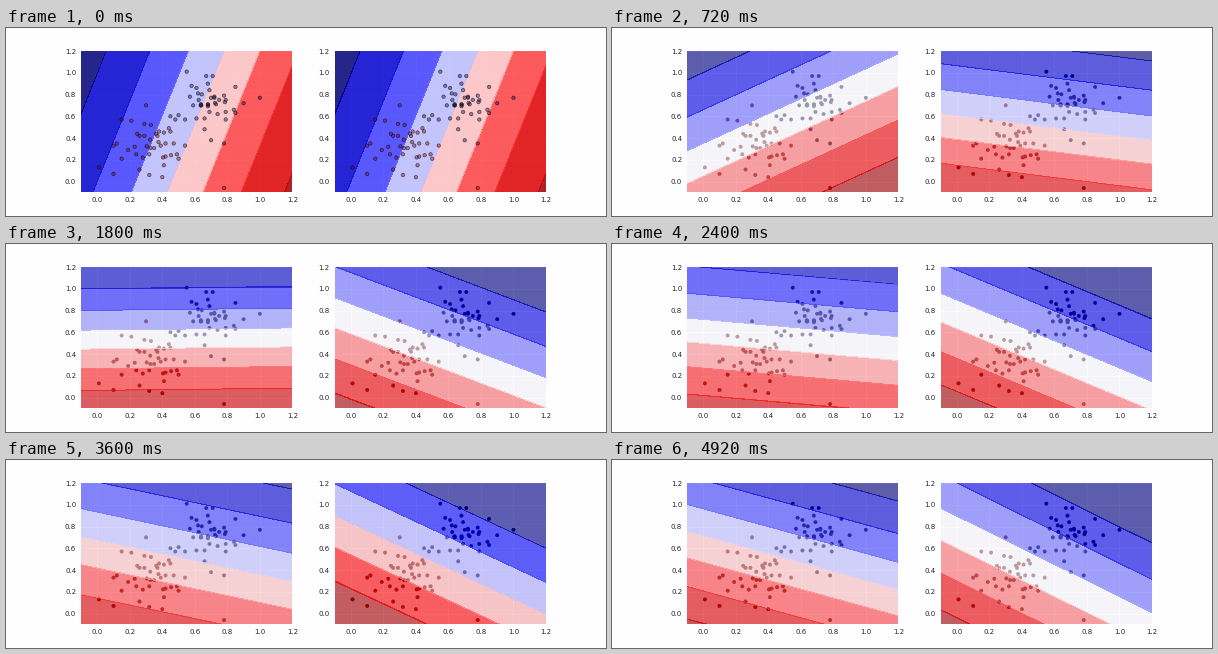
Write a matplotlib script that moves like this. It is 600 by 188 pixels and loops after 5 s.

```python
import matplotlib.pyplot as plt
import numpy as np
from matplotlib.animation import FuncAnimation

W, H, DPI = 600, 188, 50
LOW, HIGH = -0.1, 1.2
ALPHA = 0.6          # opacity of the score bands
TICK_MS, STEP_MS, LOOP_MS = 40, 100, 5000
CMAP = plt.get_cmap("seismic_r")

plt.rcParams.update({"font.family": "DejaVu Sans", "font.size": 10})

# Training steps at which both classifiers are known.
KEYS = np.array([0, 3, 11, 18, 30, 41, 49])
# angle: direction of the score gradient, measured from the y axis (degrees)
# mid, gap: centre and spacing of the score levels; bands: number of colours
MODELS = [
    dict(angle=[-74.9, -57.3, -17.7, -0.9, 12.8, 20.1, 22.3],
         mid=[-0.440, -0.168, 0.411, 0.534, 0.646, 0.643, 0.663],
         gap=[0.210, 0.285, 0.217, 0.174, 0.245, 0.242, 0.225],
         bands=[8, 7, 8, 9, 8, 8, 8], tau=13),
    dict(angle=[-74.9, -7.2, 22.6, 29.5, 33.4, 35.6, 36.5],
         mid=[-0.440, 0.436, 0.704, 0.630, 0.659, 0.693, 0.602],
         gap=[0.210, 0.204, 0.222, 0.240, 0.215, 0.247, 0.236],
         bands=[8, 8, 8, 7, 9, 6, 7], tau=10),
]

# Distinct samples in hundredths; the dense cores are filled in at random.
UPPER = [55, 101, 67, 97, 71, 97, 58, 88, 61, 86, 68, 90, 69, 84, 62, 81,
         100, 77, 85, 87, 90, 72, 78, 79, 79, 75, 78, 35, 70, 38, 66, 48,
         85, 63, 84, 66, 57, 78, 59, 70, 70, 77, 72, 78, 73, 71, 75, 75,
         74, 62, 68, 71, 64, 70, 50, 61, 48, 57, 54, 57, 61, 58, 66, 58,
         79, 64, 79, 57, 45, 60, 69, 64]
LOWER = [30, 70, 15, 57, 21, 56, 29, 53, 1, 13, 10, 33, 12, 35, 10, 7,
         15, 21, 19, 29, 23, 32, 24, 25, 26, 42, 29, 42, 26, 11, 32, 6,
         40, 4, 32, 25, 37, 42, 38, 46, 41, 45, 45, 46, 49, 25, 50, 21,
         41, 15, 42, 23, 39, 33, 33, 52, 54, 33, 78, -6, 42, 35, 47, 35,
         44, 49, 28, 22]
rng = np.random.default_rng(4)


def cluster(listed, centre, spread, extra):
    fill = rng.normal(centre, spread, (extra, 2))
    return np.vstack([np.reshape(listed, (-1, 2)) / 100, fill])


blue = cluster(UPPER, (0.71, 0.70), 0.045, 9)
red = cluster(LOWER, (0.35, 0.37), 0.07, 9)
points = np.vstack([blue, red])
labels = np.r_[np.ones(len(blue)), np.zeros(len(red))]


def make_axes(left):
    width, height, bottom = 211.36, 141.4, 23.6
    ax = fig.add_axes([left / W, bottom / H, width / W, height / H])
    ax.set(xlim=(LOW, HIGH), ylim=(LOW, HIGH), facecolor="#EAEAF2")
    ticks = np.arange(0, 1.21, 0.2)
    names = [f"{t:.1f}" for t in ticks]
    ax.set_xticks(ticks, names)
    ax.set_yticks(ticks, names)
    ax.tick_params(length=0, pad=7, labelcolor="0.15", labelsize=10)
    ax.set_axisbelow(True)
    ax.grid(color="white", lw=1)
    for spine in ax.spines.values():
        spine.set_visible(False)
    return ax


def model_at(model, step):
    """Gradient angle, level centre, level gap and colour count at a step."""
    def ease(n):
        return 1 - np.exp(-np.asarray(n) / model["tau"])
    angle, mid, gap = (np.interp(ease(step), ease(KEYS), model[key])
                       for key in ("angle", "mid", "gap"))
    nearest = np.argmin(abs(KEYS - step))
    return np.radians(angle), mid, gap, model["bands"][nearest]


def draw_points(ax, on_top):
    colors = CMAP(labels)
    edge = (0, 0, 0, 1)
    if on_top:
        colors[:, 3] = 0.4
        edge = (0, 0, 0, 0.65)
    return ax.scatter(*points.T, s=25, c=colors, edgecolors=[edge],
                      linewidths=0.9 if on_top else 0.5,
                      zorder=3 if on_top else 1)


def draw_panel(ax, model, step):
    angle, mid, gap, bands = model_at(model, step)
    corners = np.array([LOW, HIGH])
    xx, yy = np.meshgrid(corners, corners)
    score = np.sin(angle) * xx + np.cos(angle) * yy
    k = np.arange(1, bands) - bands / 2
    levels = mid + gap * (k + 0.012 * k**3)   # slight sigmoid widening
    fills = CMAP((np.arange(bands) + 0.5) / bands)
    first = step == 0

    made = [draw_points(ax, first)]
    for _ in range(2 if first else 1):
        made.append(ax.contourf(xx, yy, score, levels=levels, colors=fills,
                                extend="both", alpha=ALPHA, zorder=2))
    if not first:
        lines = CMAP(np.arange(1, bands) / bands)
        made.append(ax.contour(xx, yy, score, levels=levels, colors=lines,
                               linewidths=0.6, alpha=ALPHA, zorder=2.5))
    return made


fig = plt.figure(figsize=(W / DPI, H / DPI), dpi=DPI, facecolor="#fefdff")
panels = [make_axes(75), make_axes(328.64)]
artists = []


def update(tick):
    step = tick * TICK_MS // STEP_MS
    while artists:
        artists.pop().remove()
    for ax, model in zip(panels, MODELS):
        artists.extend(draw_panel(ax, model, step))
    return artists


anim = FuncAnimation(fig, update, frames=LOOP_MS // TICK_MS, interval=TICK_MS,
                     repeat=True, repeat_delay=0, blit=False)
plt.show()
```
